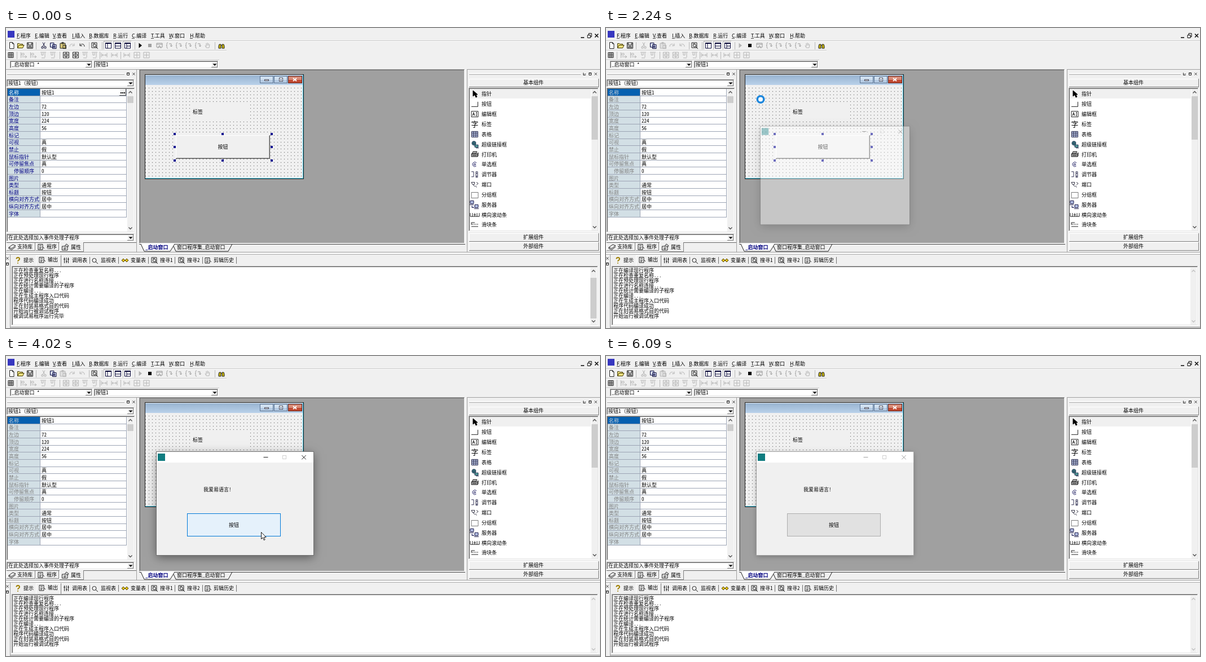
Write an HTML page with a canvas that moves like this. It is 1053x532 px and loops after 6160 ms.

```html
<!DOCTYPE html>
<html lang="zh-CN">
<head>
<meta charset="utf-8">
<title>窗口设计</title>
<style>
html, body { margin: 0; width: 100%; height: 100%; overflow: hidden; background: #f0f0f0; }
canvas { display: block; width: 100vw; height: 100vh; }
</style>
</head>
<body>
<canvas id="stage" width="1053" height="532"></canvas>
<script>
const ctx = document.getElementById('stage').getContext('2d');
const LOOP = 6160;
const FACE = '#f0f0f0', GREY = '#b4b4b4', NAVY = '#000080';
const SANS = '500 9px "Noto Sans CJK SC", "Noto Sans CJK", sans-serif';
const FAMILY = '"Noto Sans Mono CJK SC", "Noto Sans CJK SC", monospace';
const MONO = '500 9px ' + FAMILY;

// ---- drawing helpers ----
function rect(x, y, w, h, color) {
  ctx.fillStyle = color;
  ctx.fillRect(x, y, w, h);
}
function frame(x, y, w, h, color) {
  ctx.strokeStyle = color;
  ctx.lineWidth = 1;
  ctx.strokeRect(x + .5, y + .5, w - 1, h - 1);
}
function bevel(x, y, w, h, light, dark, fill) {
  if (fill) rect(x, y, w, h, fill);
  rect(x, y, w, 1, light);
  rect(x, y, 1, h, light);
  rect(x, y + h - 1, w, 1, dark);
  rect(x + w - 1, y, 1, h, dark);
}
const raised = (x, y, w, h) => bevel(x, y, w, h, '#fff', '#808080', FACE);
function sunken(x, y, w, h, fill = '#fff') {
  bevel(x, y, w, h, '#a0a0a0', '#fff');
  bevel(x + 1, y + 1, w - 2, h - 2, '#696969', '#e3e3e3', fill);
}
function text(s, x, y, color = '#000', align = 'left', font = MONO) {
  ctx.font = font;
  ctx.textAlign = align;
  ctx.textBaseline = 'middle';
  ctx.fillStyle = color;
  ctx.fillText(s, x, y);
}
function shape(d, x, y, stroke, fill, width = 1) {
  const path = new Path2D(d);
  ctx.save();
  ctx.translate(x, y);
  ctx.lineWidth = width;
  if (fill) { ctx.fillStyle = fill; ctx.fill(path); }
  if (stroke) { ctx.strokeStyle = stroke; ctx.stroke(path); }
  ctx.restore();
}
function disc(x, y, r, color) {
  ctx.beginPath();
  ctx.arc(x, y, r, 0, 7);
  ctx.fillStyle = color;
  ctx.fill();
}
const dropArrow = (x, y) => shape('M-3.5-1.5H3.5L0 2Z', x, y, null, '#000');
const chevron = (x, y, dir, color = '#505050') =>
  shape(dir < 0 ? 'M-3 1.5L0-1.5 3 1.5' : 'M-3-1.5L0 1.5 3-1.5', x, y, color, null, 1.3);
function combo(x, y, w, label) {
  sunken(x, y, w, 14);
  raised(x + w - 13, y + 2, 11, 10);
  dropArrow(x + w - 7, y + 7);
  text(label, x + 3, y + 7);
}
function scrollbar(x, y, h, thumbY, thumbH, active = true) {
  rect(x, y, 11, h, FACE);
  if (active) rect(x, thumbY, 11, thumbH, '#cdcdcd');
  const color = active ? '#505050' : '#c0c0c0';
  chevron(x + 5.5, y + 6, -1, color);
  chevron(x + 5.5, y + h - 6, 1, color);
}
function smallButton(x, y, close) {
  shape(close ? 'M-2-2L2 2M2-2L-2 2' : 'M-2-2H2V2H-2ZM-2-1.5H2', x + .5, y + .5, '#222');
}

// ---- icons, drawn around their centre ----
const ICONS = {
  page: 'M-3.5-5.5H1.5L4-3V5.5H-3.5ZM1.5-5.5V-3H4',
  folder: 'M-5.5 4.5V-3.5H-2L-1-2.5H3.5V-.5M-5.5 4.5L-3-.5H6L3.5 4.5Z',
  disk: 'M-5-5H5V5H-5ZM-3-5V-1H3V-5M-2 5V2H2V5',
  cut: 'M-2-5.5L2 2M2-5.5L-2 2M-4 2H-1V5H-4ZM1 2H4V5H1Z',
  copy: 'M-5.5-4.5H1V3H-5.5ZM-1.5-1.5H5V5.5H-1.5ZM0 1.5H3.5M0 3.5H3.5',
  paste: 'M-5-4H4V5H-5ZM-2-5.5H1V-3H-2ZM0-.5H5.5V5.5H0Z',
  redo: 'M-4 2C-4-4 2-3 3.5-.5M4-3.5V.5H0',
  undo: 'M4 2C4-4-2-3-3.5-.5M-4-3.5V.5H0',
  find: 'M-5-5H4V4H-5ZM-3-3H1M2 2L6 6M2.5 0A2.5 2.5 0 1 1-2.5 0A2.5 2.5 0 1 1 2.5 0',
  grid: 'M-4.5-4.5H4.5V4.5H-4.5ZM-4.5-1.5H4.5M-4.5 1.5H4.5M-1.5-4.5V4.5M1.5-4.5V4.5',
  layout: 'M-5-4.5H5V5H-5ZM-5-3.5H5M-1.5-4V5',
  layoutRow: 'M-5-4.5H5V5H-5ZM-5-3.5H5M-5 1H5',
  layoutBoth: 'M-5-4.5H5V5H-5ZM-5-3.5H5M-1.5-4V5M-1.5 1H5',
  run: 'M-2.5-4.5L3 0-2.5 4.5Z',
  stop: 'M-3-3H3V3H-3Z',
  window: 'M-5-4H5V3H-5ZM-5-2H5M-3 5L0 0 3 5',
  brace: 'M-2-5C-6-5-2 0-5 0-2 0-6 5-2 5M0-3H4V2M2 0L4 2 6 0',
  hand: 'M-4 0L-2 4H3L4-2M-2 2V-4M0 0V-5M2 0V-4',
  binoculars: 'M-4-3H-1V4H-5V0ZM1-3H4L5 0V4H1ZM-1-1H1',
  alignH: 'M-5.5-5V5M-4-3H0V0H-4ZM-4 3H5M2 1L5 3 2 5',
  alignV: 'M-5-5H5M-3-4V0H0V-4M3-4V4M-3 5H3',
  centre: 'M-5-5H5V5H-5ZM0-5V5M-3-2H3V2H-3Z',
  spread: 'M-5-4V4M5-4V4M-3 0H3M-2-2L-4 0-2 2M2-2L4 0 2 2',
  stretch: 'M-5-5H5V5H-5ZM0-4V4M-4 0H4',
  books: 'M-6 1L1-4 6-2-1 3ZM-6 3L-1 5.5 6 0M-6 1V3',
  list: 'M-5-4.5H3V5H-5ZM-3-2H1M-3 1H1M-3 3H0M3 0L6 3',
  card: 'M-5.5-2H4V5H-5.5ZM-3 1H2M-3 3H1M-1-2L2-6 6-3 4 0',
  help: 'M-2.5-2.5C-2.5-6 3-6 3-2.5 3 0 0-.5 0 2M0 4V5.5',
  columns: 'M-3.5-5V5M0-5V5M3.5-5V5M-5-2H-2M-1 2H2M2-2H5',
  lens: 'M2 0A3.5 3.5 0 1 1-5 0A3.5 3.5 0 1 1 2 0M1 2.5L5 6',
  glasses: 'M-6 0L-3-3 0 0-3 3ZM0 0L3-3 6 0 3 3Z',
  pointer: 'M-3-6V4L0 1.5 2 6 4 5 2 1H5Z',
  corner: 'M-6 4.5H5.5V-4',
  edit: 'M-6-5H6V5H-6ZM-4 3L-2-3 0 3M-3 1H-1M3-3V3M2-3H4M2 3H4',
  table: 'M-5.5-5H5.5V5H-5.5ZM-5.5-2H5.5M-5.5 1.5H5.5M-2-5V5M2-5V5',
  globe: 'M2-2A3.5 3.5 0 1 1-5-2A3.5 3.5 0 1 1 2-2M-5-2H2M-1.5-5V1M0 1H6V5H0ZM2 6.5H7',
  printer: 'M-3-5H4L2-1H-5ZM-6-1H5V4H-6ZM-4 2H3M5-1L6-3V2L5 4',
  radio: 'M2.5 3A4 4 0 1 1 3-3M1.5 0A1.5 1.5 0 1 1-1.5 0A1.5 1.5 0 1 1 1.5 0',
  spin: 'M-6-5H-2M-6 4H-2V-5M2-5H5V5H2ZM3-1L3.5-3 4-1M3 2L3.5 4 4 2',
  plug: 'M-6-4H0L-1 0H-4ZM-2 0C-2 6 3 0 3 5M3-4L6-2 3 1',
  group: 'M-6-4H6V6H-6Z',
  server: 'M-8-7H-2V-2H-8ZM-9 0H-2M0 0H6V5H0ZM-1 7H7M-5 2V5H-1',
  slider: 'M-8-3V3H8V-3M-4-3V3M4-3V3M-2 0H2M0-3V3',
  track: 'M-6 3H6M-6 0V-4H0M-4-2V0M-1-2V0M2-2V0M5-2V0',
};
const icon = (name, x, y, color = '#222', fill, width) => shape(ICONS[name], x, y, color, fill, width);

// ---- content ----
const MENU = [['F.程序', 19], ['E.编辑', 51], ['V.查看', 83], ['I.插入', 117], ['B.数据库', 147],
  ['R.运行', 190], ['C.编译', 223], ['T.工具', 257], ['W.窗口', 289], ['H.帮助', 326]];
const PROPERTIES = [['名称', '按钮1'], ['备注', ''], ['左边', '72'], ['顶边', '120'], ['宽度', '224'],
  ['高度', '56'], ['标记', ''], ['可视', '真'], ['禁止', '假'], ['鼠标指针', '默认型'], ['可停留焦点', '真'],
  ['  停留顺序', '0'], ['图片', ''], ['类型', '通常'], ['标题', '按钮'], ['横向对齐方式', '居中'],
  ['纵向对齐方式', '居中'], ['字体', '']];
const COMPONENTS = [['指针', 'pointer', '#000'], ['按钮', 'corner'], ['编辑框', 'edit'], ['标签'],
  ['表格', 'table', '#224', '#c8d4f0'], ['超级链接框', 'globe', '#124', '#58a8a0'],
  ['打印机', 'printer', '#222', '#aaa'], ['单选框', 'radio', '#226'], ['调节器', 'spin', '#335'],
  ['端口', 'plug', '#334'], ['分组框', 'group', '#777'], ['服务器', 'server', '#114', '#b8c4e8'],
  ['横向滚动条', 'slider'], ['滑块条', 'track']];
const OUTPUT_TABS = [['提示', 31, 'help', '#a08000'], ['输出', 74, 'list'], ['调用表', 117, 'columns'],
  ['监视表', 168, 'lens'], ['变量表', 221, 'glasses', '#554400'], ['搜寻1', 273, 'find'],
  ['搜寻2', 321, 'find'], ['剪辑历史', 368, 'list']];
const LOG = ['正在编译现行程序', '正在检查重复名称...', '正在预处理现行程序', '正在进行名称连接...',
  '正在统计需要编译的子程序', '正在编译...', '正在生成主程序入口代码', '程序代码编译成功',
  '正在封装易格式目的代码', '开始运行被调试程序', '被调试易程序运行完毕'];

function drawToolbars(running) {
  rect(3, 5, 12, 12, '#3838c0');
  for (const [label, x] of MENU) {
    text(label, x, 14, '#000', 'left', SANS);
    rect(x, 18, 5, 1, '#444');
  }
  shape('M-3 3H3', 1022, 14, '#000', null, 1.5);
  shape('M-3-1H2V4H-3ZM-1-1V-4H4V2H2', 1034, 13.5, '#000');
  shape('M-3-3L3 3M3-3L-3 3', 1047, 13.5, '#000', null, 1.4);
  for (const [y, end] of [[22, 1053], [39, 391], [56, 378]]) {
    rect(0, y, end, 1, '#c8c8c8');
    rect(0, y + 1, end, 1, '#fff');
  }
  const idle = running ? GREY : '#222';
  icon('page', 10, 31, '#222', '#fff');
  icon('folder', 26, 31, '#443c00', '#f0e080');
  icon('disk', 42.5, 31, '#222', '#b8b8b8');
  icon('cut', 67, 31, running ? GREY : '#224');
  icon('copy', 84, 31, '#003', '#d8e0ff');
  icon('paste', 101, 31, idle, running ? '#e0e0e0' : '#d8c878');
  icon('redo', 117, 31, GREY);
  icon('undo', 135, 31, idle);
  icon('find', 157, 31);
  ['layout', 'layoutRow', 'layoutBoth'].forEach((n, i) => {
    bevel(173 + i * 17, 23, 16, 16, '#b0b0b0', '#fff', '#f8f8f8');
    icon(n, 181.5 + i * 17, 31, '#003', '#fff');
    rect(176 + i * 17, 26, 11, 2, '#003');
  });
  icon('run', 238, 31, null, running ? GREY : '#000');
  icon('stop', 255, 31, null, running ? '#000' : '#a0a0a0');
  icon('window', 272, 31, '#999');
  for (let x = 289; x < 345; x += 17) icon('brace', x, 31, '#999');
  icon('hand', 357, 31, GREY);
  icon('binoculars', 382, 32, '#222', '#c8b400');
  icon('grid', 8.5, 48);
  [32, 49].forEach(x => icon('alignH', x, 48, GREY));
  [66, 83].forEach(x => icon('alignV', x, 48, GREY));
  [106.5, 123.5].forEach(x => icon('centre', x, 48, idle));
  [140, 157].forEach(x => icon('alignV', x, 48, GREY));
  [174, 192, 214].forEach(x => icon('spread', x, 48, GREY));
  [232, 249].forEach(x => icon('stretch', x, 48, GREY));
  for (const x of [53, 147, 170, 228, 370]) rect(x, 25, 1, 13, '#b8b8b8');
  for (const x of [19, 95, 166, 203]) rect(x, 42, 1, 13, '#b8b8b8');
  combo(7, 58, 147, '_启动窗口 *');
  combo(156, 58, 221, '按钮1');
}

function drawProperties(running) {
  rect(0, 73, 236, 1, '#a0a0a0');
  rect(231, 74, 1, 323, '#a0a0a0');
  rect(2, 80, 208, 1, '#fff');
  rect(2, 82, 208, 1, '#b0b0b0');
  smallButton(216, 81);
  smallButton(226, 81, true);
  combo(1, 91, 227, '按钮1（按钮）');
  sunken(1, 106, 228, 257);
  const pitch = 12.65;
  PROPERTIES.forEach(([name, value], i) => {
    const y = 108 + i * pitch, top = Math.round(y), bottom = Math.round(y + pitch);
    rect(3, top, 58, bottom - top, i ? '#d2dfe5' : '#0560b0');
    rect(3, bottom - 1, 211, 1, '#9ca4b4');
    text(name, 5, y + 6.3, i ? running ? '#808080' : NAVY : running ? '#c8d0d8' : '#fff');
    text(value, 63, y + 6.3);
  });
  rect(60, 108, 1, 227, '#9ca4b4');
  rect(213, 108, 1, 227, '#9ca4b4');
  if (!running) {
    bevel(201, 108, 12, 12, '#fff', '#505050', FACE);
    for (const x of [204, 207, 210]) rect(x - 1, 114, 2, 2, '#000');
  }
  scrollbar(215, 108, 253, 121, 12);
  combo(1, 365, 227, '在此处选择加入事件处理子程序');
  raised(1, 380, 51, 15);
  raised(53, 380, 41, 15);
  rect(1, 380, 230, 1, '#696969');
  raised(95, 380, 43, 17);
  rect(96, 380, 41, 1, FACE);
  icon('books', 11, 388);
  icon('list', 62, 388);
  icon('card', 105, 389);
  text('支持库', 20, 388);
  text('程序', 72, 388);
  text('属性', 115, 389);
}

function captionButton(x, w, top, bottom, edge) {
  rect(x, 85, w, 7, top);
  rect(x, 92, w, 6, bottom);
  frame(x, 85, w, 13, edge);
}

function drawDesigner() {
  sunken(236, 73, 578, 310, '#a0a0a0');
  rect(246, 82, 282, 186, '#202020');
  bevel(247, 83, 280, 184, '#e8f2fa', '#38c4e4');
  const bar = ctx.createLinearGradient(0, 84, 0, 101);
  bar.addColorStop(0, '#99b4d1');
  bar.addColorStop(1, '#b9d1ea');
  rect(247, 84, 279, 17, bar);
  rect(247, 101, 279, 165, FACE);
  for (let y = 106; y < 266; y += 6)
    for (let x = 247; x < 526; x += 6) rect(x, y, 1, 1, '#505050');
  rect(331, 131, 100, 30, FACE);
  text('标签', 331, 149);
  captionButton(450, 24, '#d0e0f0', '#b4cae2', '#5a7290');
  captionButton(475, 24, '#d0e0f0', '#b4cae2', '#5a7290');
  captionButton(500, 25, '#d88c78', '#c04830', '#6a2418');
  bevel(458, 91, 8, 3, '#445', '#445', '#fff');
  bevel(484, 88, 7, 7, '#445', '#445', '#fff');
  rect(486, 91, 3, 2, '#6880a0');
  shape('M-3-2.5L3 2.5M3-2.5L-3 2.5', 512, 91.5, '#fff', null, 1.8);
  bevel(301, 190, 167, 42, '#fff', '#505050', FACE);
  rect(302, 230, 165, 1, '#a8a8a8');
  rect(466, 191, 1, 40, '#a8a8a8');
  text('按钮', 384.5, 211, '#000', 'center');
  for (const x of [299, 384, 471])
    for (const y of [188, 211, 235])
      if (x !== 384 || y !== 211) rect(x - 2, y - 2, 4, 4, '#0c0c90');
  rect(236, 383, 578, 1, '#404040');
  shape('M0 0L6 13H52L60 0', 239, 383, '#222', '#fff');
  shape('M58 4L62 13H155L162 0', 239, 383, '#222');
  text('_启动窗口', 247, 389, NAVY, 'left', 'bold 9px ' + FAMILY);
  text('窗口程序集_启动窗口', 303, 389);
}

function drawComponents() {
  rect(817, 73, 236, 1, '#a0a0a0');
  rect(817, 74, 1, 323, '#a0a0a0');
  rect(821, 80, 198, 1, '#fff');
  rect(821, 82, 198, 1, '#b0b0b0');
  shape('M-2-2V2H2M0 0H2', 1025.5, 81.5, '#222');
  smallButton(1035, 81);
  smallButton(1045, 81, true);
  for (const [label, y] of [['基本组件', 97], ['扩展组件', 371], ['外部组件', 387]]) {
    raised(821, y - 7, 230, 15);
    text(label, 935, y, '#000', 'center');
  }
  sunken(820, 106, 231, 255);
  rect(822, 108, 215, 17, FACE);
  COMPONENTS.forEach(([label, name, color, fill], i) => {
    const y = 117 + i * 17.85;
    text(label, 843, y);
    if (name) icon(name, 831, y, color, name === 'pointer' ? '#000' : fill);
    else text('字', 831, y, '#000', 'center', '500 13px ' + FAMILY);
  });
  scrollbar(1038, 108, 251, 121, 77);
}

function drawOutput(running, first, count) {
  rect(0, 397, 1053, 1, '#a0a0a0');
  rect(0, 399, 1053, 1, '#fff');
  rect(0, 401, 1053, 1, '#b0b0b0');
  smallButton(2, 408, true);
  smallButton(2, 418);
  rect(7, 402, 1, 130, '#a0a0a0');
  raised(53, 403, 45, 20);
  for (const x of [148, 199, 252, 299, 348, 408]) rect(x, 406, 1, 12, '#707070');
  OUTPUT_TABS.forEach(([label, x, name, color], i) => {
    const y = i === 1 ? 411 : 412;
    text(label, x, y);
    icon(name, x - 10, y, color, name === 'glasses' ? '#e0c020' : undefined, name === 'help' ? 2 : 1);
  });
  sunken(10, 422, 1040, 106);
  LOG.slice(first, first + count).forEach((line, i) => text(line, 13, 429.5 + i * 9));
  scrollbar(1036, 425, 101, 443, 72, !running);
  rect(8, 530, 1045, 1, '#808080');
}

const mix = (a, b, k) => `rgb(${a.map((v, i) => Math.round(v + (b[i] - v) * k))})`;

function drawShadow(active) {
  ctx.save();
  const outside = new Path2D();
  outside.rect(0, 0, 1053, 532);
  outside.rect(267, 170, 278, 183);
  ctx.clip(outside, 'evenodd');
  ctx.shadowColor = `rgba(0,0,0,${active ? .45 : .3})`;
  ctx.shadowBlur = active ? 16 : 9;
  ctx.shadowOffsetY = active ? 4 : 2;
  rect(267, 170, 278, 183, '#fff');
  ctx.restore();
}

function drawWindow({ alpha, scale, ready, active, hover, pressed, label }) {
  ctx.save();
  ctx.translate(406, 261);
  ctx.scale(scale, scale);
  ctx.translate(-406, -261);
  ctx.globalAlpha = alpha;
  drawShadow(active);
  rect(267, 170, 278, 183, '#fff');
  frame(266, 169, 280, 185, active ? '#707070' : '#a0a0a0');
  rect(269, 173, 13, 13, '#107c80');
  const control = active ? '#222' : '#a0a0a0';
  shape('M-4 0H4', 460.5, 179.5, control);
  frame(490, 176, 7, 7, '#d0d0d0');
  shape('M-3.7-3.7L3.7 3.7M3.7-3.7L-3.7 3.7', 528, 179.7, control);
  if (ready) {
    rect(267, 189, 278, 164, FACE);
    text(label, 350, 237);
    rect(321, 279, 166, 41, pressed ? '#cce4f7' : mix([225, 225, 225], [229, 241, 251], hover));
    frame(321, 279, 166, 41, pressed ? '#005499' : mix([173, 173, 173], [0, 120, 215], hover));
    text('按钮', 404, 300, '#000', 'center');
  }
  ctx.restore();
}

// ---- timing ----
const RUNS = [0, 190, 1150, 1780, 1980, 2110, 2240, 2310, 2790, 4020, 4580, 5200, 6090];
const CURSOR = [[190, 1017, 517], [330, 800, 430], [470, 520, 360], [610, 299, 306], [750, 380, 210],
  [820, 379, 210], [1080, 379, 210], [1150, 372, 201], [1430, 300, 110], [1710, 237, 31], [2110, 237, 31],
  [2310, 294, 178], [2450, 310, 205], [2650, 385, 285], [2790, 412, 312], [3000, 430, 302], [3950, 430, 302],
  [4020, 452, 312], [4160, 520, 335], [4300, 563, 347], [4440, 510, 325], [4580, 455, 308], [4720, 457, 305],
  [4860, 490, 310], [5060, 640, 330], [5200, 775, 346], [5410, 880, 420], [5620, 961, 506]];
const HOVER = [[2650, 0], [2930, 1], [4090, 1], [4300, 0], [4440, 0], [4580, .5], [4720, 1], [4930, 1], [5340, 0]];
const FADE = [[2180, 0, .92], [2240, .4, .95], [2310, .8, .988], [2380, 1, 1]];

// The picture advances in 70 ms steps counted from the start of each run.
function stepped(t) {
  const start = RUNS.findLast(s => s <= t);
  return start + Math.floor((t - start) / 70) * 70;
}
function at(keys, t) {
  const next = keys.findIndex(k => k[0] > t);
  if (next === 0) return keys[0].slice(1);
  if (next < 0) return keys.at(-1).slice(1);
  const a = keys[next - 1], b = keys[next], k = (t - a[0]) / (b[0] - a[0]);
  return a.slice(1).map((v, i) => v + (b[i + 1] - v) * k);
}
const within = (t, from, to) => t >= from && t < to;

function drawCursor(t) {
  if (!within(t, 190, 5690)) return;
  const [x, y] = at(CURSOR, t);
  if (within(t, 2110, 2380)) {
    disc(x, y, 7.5, '#1c86dc');
    disc(x, y, 4, '#f4faff');
    return;
  }
  if (within(t, 1710, 2110) || within(t, 3070, 3280)) disc(x + 1, y, 8, 'rgba(240,225,40,.7)');
  shape('M0 0V12L2.8 9.4 4.7 14 6.6 13.2 4.8 8.8H8.6Z', x + .5, y + .5, '#000', '#fff', .9);
}

function draw(time) {
  const t = stepped(time % LOOP);
  const running = t >= 2110;
  rect(0, 0, 1053, 532, FACE);
  drawToolbars(running);
  drawProperties(running);
  drawDesigner();
  drawComponents();
  drawOutput(running, running ? 0 : 1, within(t, 2110, 2180) ? 4 : within(t, 2180, 2240) ? 9 : 10);
  if (t >= 2240) {
    const [alpha, scale] = at(FADE, t);
    drawWindow({
      alpha, scale,
      ready: t >= 2380,
      active: t < 6090,
      hover: at(HOVER, t)[0],
      pressed: within(t, 3070, 3280),
      label: t < 3280 ? '标签' : '我爱易语言!',
    });
  }
  drawCursor(t);
}

const began = performance.now();
(function tick() {
  draw(performance.now() - began);
  requestAnimationFrame(tick);
})();
</script>
</body>
</html>
```
